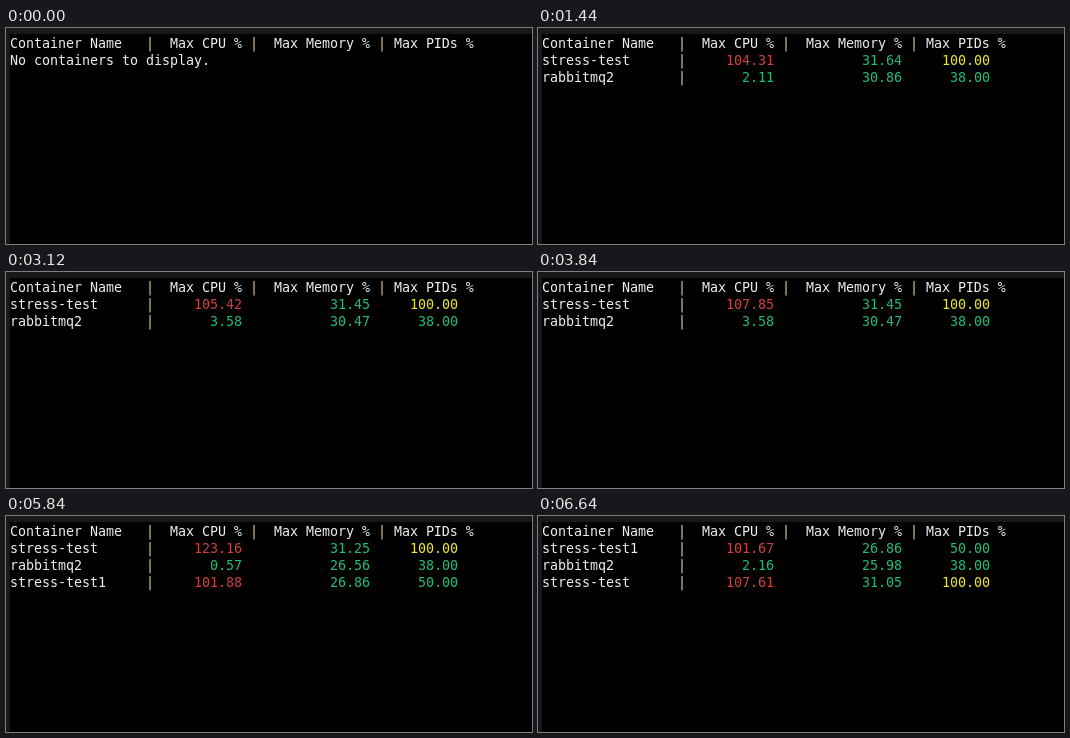
These frames come from a looping animation (526 px wide and 216 px high, 6.88 s). An HTML page:

```html
<!DOCTYPE html>
<html lang="en">
<head>
<meta charset="utf-8">
<title>Container peaks</title>
<style>
  html, body { margin: 0; width: 100%; height: 100%; overflow: hidden; background: #181818; }
  #term { position: absolute; inset: 6px 0 0 4px; background: #000; }
  pre {
    position: absolute; left: 0; top: 1px; margin: 0; color: #eee;
    font: 13.333px/17px "DejaVu Sans Mono", monospace;
    letter-spacing: -0.027px;
  }
  .bar { color: #e8cd92; }
  .high { color: #cf4040; }
  .warn { color: #ebe534; }
  .ok { color: #20bc7a; }
</style>
</head>
<body>
<div id="term"><pre id="out"></pre></div>
<script>
const LOOP = 6880;
const out = document.getElementById('out');
const BAR = '<span class="bar">|</span>';
const HEADER = 'Container Name   |  Max CPU % |  Max Memory % | Max PIDs %'.replaceAll('|', BAR);

// Time, row, then name, CPU, memory and PIDs
const updates = [
  [480, 0, 'stress-test', 149.52, 31.84, 100],
  [640, 1, 'rabbitmq2', 119.29, 31.25, 70],
  [1280, 0, 'stress-test', 104.31, 31.64, 100],
  [1440, 1, 'rabbitmq2', 2.11, 30.86, 38],
  [2160, 0, 'stress-test', 103.06, 31.45, 100],
  [2320, 1, 'rabbitmq2', 1.54, 30.66, 38],
  [2960, 0, 'stress-test', 105.42, 31.45, 100],
  [3120, 1, 'rabbitmq2', 3.58, 30.47, 38],
  [3840, 0, 'stress-test', 107.85, 31.45, 100],
  [4000, 1, 'rabbitmq2', 4.12, 29.88, 38],
  [4480, 0, 'stress-test', 106.55, 31.25, 100],
  [4640, 1, 'rabbitmq2', 5.04, 29.30, 38],
  [5680, 0, 'stress-test', 123.16, 31.25, 100],
  [5680, 1, 'rabbitmq2', 0.57, 26.56, 38],
  [5840, 2, 'stress-test1', 101.88, 26.86, 50],
  [6480, 0, 'stress-test1', 101.67, 26.86, 50],
  [6480, 2, 'stress-test', 123.16, 31.25, 100],
  [6560, 1, 'rabbitmq2', 2.16, 25.98, 38],
  [6640, 2, 'stress-test', 107.61, 31.05, 100]
];

function cell(value, width) {
  const level = value > 100 ? 'high' : value >= 90 ? 'warn' : 'ok';
  return `<span class="${level}">${value.toFixed(2).padStart(width)}</span>`;
}

function line([name, cpu, memory, pids]) {
  return name.padEnd(17) + BAR + cell(cpu, 11) + cell(memory, 16) + cell(pids, 11);
}

function screen(t) {
  const rows = [];
  for (const [at, row, ...data] of updates) if (at <= t) rows[row] = data;
  const body = rows.length ? rows.map(line) : ['No containers to display.'];
  return [HEADER, ...body].join('\n');
}

let shown = '';
function tick() {
  const next = screen((performance.now() - start) % LOOP);
  if (next !== shown) out.innerHTML = shown = next;
  requestAnimationFrame(tick);
}
const start = performance.now();
tick();
</script>
</body>
</html>
```
